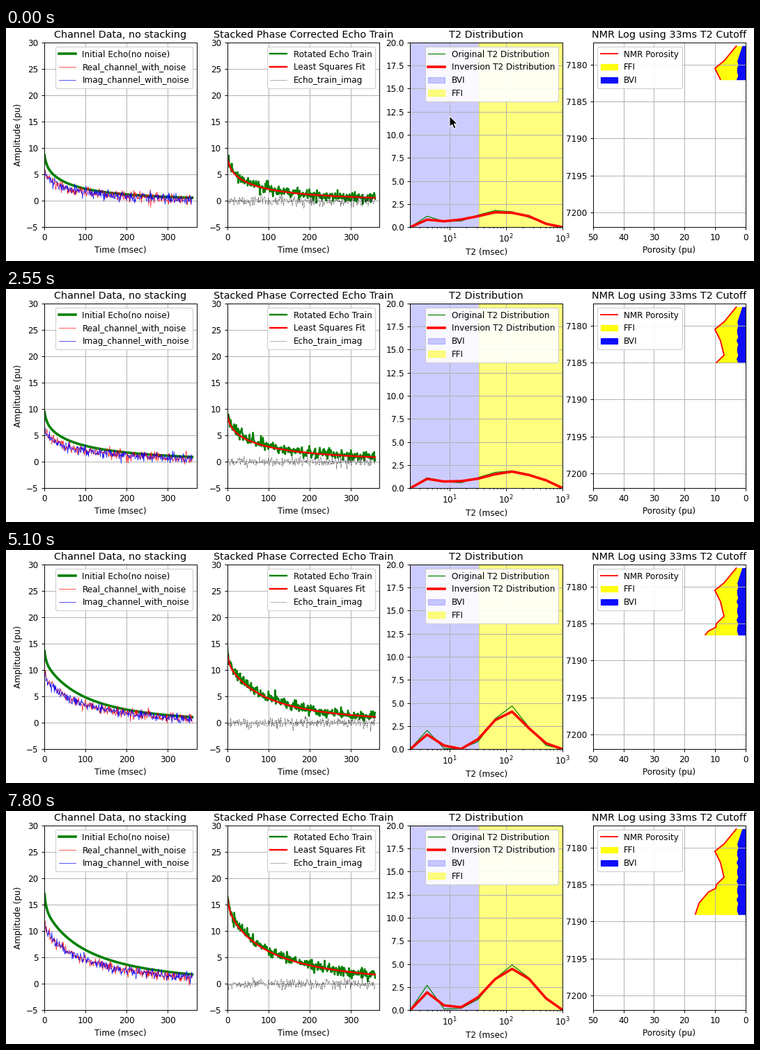
A matplotlib script for the animation above (8 s loop, 1074 px wide and 336 px high).

```python
import numpy as np
import matplotlib.pyplot as plt
from matplotlib.animation import FuncAnimation
from matplotlib.patches import Polygon
from matplotlib.transforms import IdentityTransform

W, H, DPI = 1074, 336, 86.2
LOOP, STEP = 8000, 50

STARTS = [0, 150, 300, 450, 900, 1350, 2100, 2550,
          3150, 4200, 5100, 5850, 6900, 7800]
POINTER = {0: (637, 127), 1: (675, 201)}

BINS = np.arange(10)
T2 = 2.0 ** (BINS + 1)
ECHO = 0.4 + 1.2 * np.arange(300)
DEPTH = 7177.5 + 0.5 * np.arange(24)
POROSITY = np.interp(
    DEPTH - 7177.5,
    [0, 2, 3, 4.5, 6.5, 7.5, 8, 8.5, 10, 11.5],
    [3, 7, 10, 8.2, 7, 9.5, 9.7, 12.1, 15.2, 16.4])
BOUND = np.minimum(1 + 0.8 * (DEPTH - 7177.5), 2.55 + 0.3 * np.sin(5 * DEPTH))

# The tiny margin keeps the pixel size from rounding down
fig = plt.figure(figsize=((W + 1e-6) / DPI, (H + 1e-6) / DPI), dpi=DPI,
                 facecolor="white")
plt.rcParams.update({"legend.labelspacing": 0.48, "legend.framealpha": 0.9})


def track(pos, *keys):
    return np.interp(pos, range(len(keys)), keys)


def bump(center, height, width):
    return height * np.exp(-0.5 * ((BINS - center) / width) ** 2)


def spectrum(pos):
    """Short and long relaxation peaks that merge in the tighter rock."""
    tight = np.exp(-((pos - 1.8) / 0.7) ** 2)
    short = bump(1 + 2.5 * tight,
                 track(pos, 1.15, 0.55, 1.35, 1.1, 2.2, 1.9, 2.7),
                 track(pos, 0.7, 1.6, 1.0, 0.7, 0.4, 0.4, 0.4))
    long = bump(5.3 + 0.12 * pos + 2.5 * tight,
                track(pos, 1.85, 1.05, 1.25, 1.9, 3.7, 5.8, 4.9),
                track(pos, 1.6, 2.8, 1.8, 1.8, 1.05, 0.92, 1.2))
    amps = short + long
    amps[[0, -1]] = 0
    return amps


def invert(amps, rng):
    """Regularised inversion: a smoothed spectrum with a slight ripple."""
    fit = np.convolve(amps, [0.15, 0.7, 0.15], "same")
    fit = np.maximum(fit + rng.normal(0, 0.1, len(fit)), 0)
    fit[[0, -1]] = 0
    return fit


def decay(amps):
    return np.exp(-ECHO[:, None] / T2) @ amps


def panel(col, title, xlabel):
    ax = fig.add_axes([(55 + 262.6 * col) / W, 1 - 287.4 / H,
                       218.8 / W, 266.6 / H])
    ax.set_title(title)
    ax.set_xlabel(xlabel)
    ax.grid(True)
    return ax


def echo_axes(ax):
    ax.set(xlim=(0, 370), ylim=(-5, 30), xticks=range(0, 301, 100))
    ax.legend(loc="upper right")


def draw_pointer(x, y):
    shape = np.array([(0, 0), (0, 15.5), (3.6, 12.2), (6.2, 18), (8.8, 16.9),
                      (6.3, 11.2), (11, 11.2)])
    pts = np.array([x, H - y]) + shape * [1, -1]
    fig.add_artist(Polygon(pts, closed=True, fc="black", ec="white", lw=0.8,
                           transform=IdentityTransform(), zorder=20))


def draw_state(i):
    fig.clear()
    pos = (i - 1) / 2 if i > 2 else 0
    rng = np.random.default_rng(int(40 + 2 * pos))
    true = spectrum(pos)
    fit = invert(true, rng)
    signal = decay(true)

    def noise():
        return rng.normal(0, 0.5, len(ECHO))

    ax = panel(0, "Channel Data, no stacking", "Time (msec)")
    ax.set_ylabel("Amplitude (pu)")
    ax.plot(ECHO, signal, "g", lw=3, label="Initial Echo(no noise)")
    for color, name in (("r", "Real"), ("b", "Imag")):
        ax.plot(ECHO, signal * np.sqrt(0.5) + noise(), color, lw=0.55,
                label=name + "_channel_with_noise")
    echo_axes(ax)

    ax = panel(1, "Stacked Phase Corrected Echo Train", "Time (msec)")
    ax.plot(ECHO, signal + noise(), "g", lw=2, label="Rotated Echo Train")
    ax.plot(ECHO, decay(fit), "r", lw=2, label="Least Squares Fit")
    ax.plot(ECHO, noise(), "--", color="0.2", lw=0.45,
            label="Echo_train_imag")
    echo_axes(ax)

    ax = panel(2, "T2 Distribution", "T2 (msec)")
    ax.set_xscale("log")
    ax.plot(T2, true, "g", lw=1, label="Original T2 Distribution")
    ax.plot(T2, fit, "r", lw=3, label="Inversion T2 Distribution")
    ax.axvspan(2, 33, color="blue", alpha=0.2, label="BVI")
    ax.axvspan(33, 1000, color="yellow", alpha=0.5, label="FFI")
    ax.set(xlim=(2, 1000), ylim=(0, 20), yticks=np.arange(0, 20.1, 2.5))
    ax.legend(loc="upper right")

    ax = panel(3, "NMR Log using 33ms T2 Cutoff", "Porosity (pu)")
    logged = DEPTH <= np.interp(pos, [0, 1, 4, 6], [7182, 7183, 7186, 7189])
    depth, total, bound = DEPTH[logged], POROSITY[logged], BOUND[logged]
    ax.plot(total, depth, "r", lw=1.5, label="NMR Porosity")
    ax.fill_betweenx(depth, bound, total, color="yellow", alpha=0.95,
                     label="FFI")
    ax.fill_betweenx(depth, 0, bound, color="blue", alpha=0.95, label="BVI")
    ax.set(xlim=(50, 0), ylim=(7202, 7177), yticks=range(7180, 7201, 5))
    ax.legend(loc="upper left")

    if i in POINTER:
        draw_pointer(*POINTER[i])
    fig.canvas.draw()
    return np.asarray(fig.canvas.buffer_rgba()).copy()


# Each state holds still, so it is rendered once and then shown
shots = [draw_state(i) for i in range(len(STARTS))]
fig.clear()
screen = fig.figimage(shots[0])


def update(n):
    screen.set_data(shots[np.searchsorted(STARTS, n * STEP, "right") - 1])
    return (screen,)


anim = FuncAnimation(fig, update, frames=LOOP // STEP, interval=STEP,
                     repeat=True, repeat_delay=0, cache_frame_data=False)
plt.show()
```
